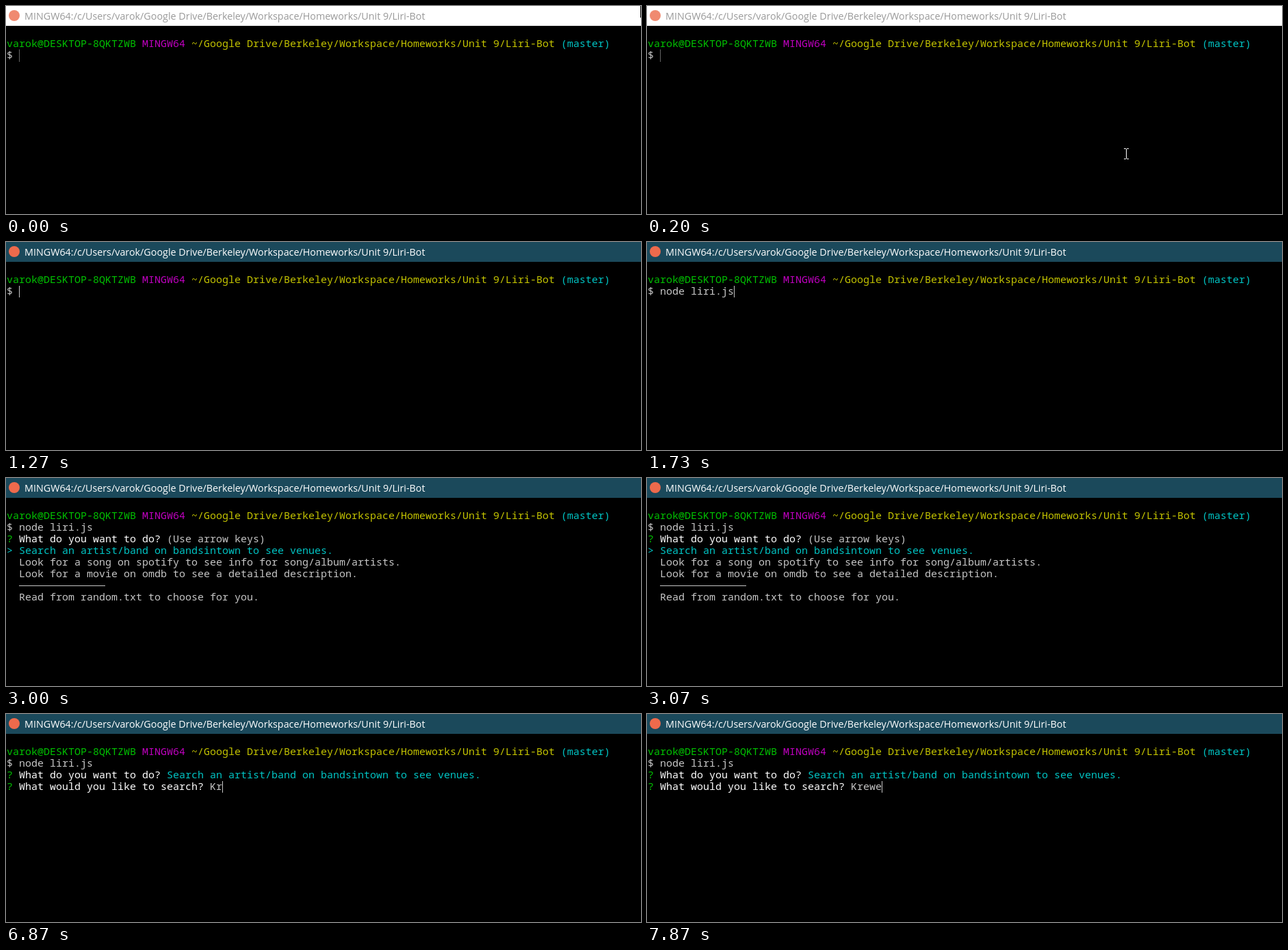
These frames come from a looping animation (928x304 px, 8000 ms). An HTML page with a canvas:

```html
<!DOCTYPE html>
<html lang="en">
<head>
<meta charset="utf-8">
<title>Terminal session</title>
<style>
html, body { margin: 0; width: 100%; height: 100%; overflow: hidden; background: #000; }
canvas { display: block; }
</style>
</head>
<body>
<canvas id="stage" width="928" height="304"></canvas>
<script>
const ctx = document.getElementById('stage').getContext('2d', { alpha: false });
const LOOP = 8000, CELL = 9, LINE = 17, LEFT = 1, TOP = 47;
const GREY = '#c6c6c6', WHITE = '#ffffff', GREEN = '#00c200',
      MAGENTA = '#bf00bf', YELLOW = '#c4c400', CYAN = '#00c4c4';

const USER = 'varok', HOST = 'DESKTOP-8QKTZWB';
const PATH = 'Google Drive/Berkeley/Workspace/Homeworks/Unit 9/Liri-Bot';
const TITLE = `MINGW64:/c/Users/${USER}/${PATH}`;
const CHOICE = 'Search an artist/band on bandsintown to see venues.';
const TASK = 'What do you want to do? ';
const SEARCH = 'What would you like to search? ';
const KEY_TIMES = [6670, 6870, 7130, 7470, 7870];
const ANSWER = 'Krewe';

function rect(x, y, w, h, color) {
  ctx.fillStyle = color;
  ctx.fillRect(x, y, w, h);
}

// Writes [text, color] spans one after another on a terminal row.
function write(row, ...spans) {
  ctx.font = '500 15px "Noto Sans Mono", "DejaVu Sans Mono", monospace';
  let x = LEFT;
  for (const [text, color] of spans) {
    ctx.fillStyle = color;
    ctx.fillText(text, x, TOP + row * LINE + 13);
    x += text.length * CELL;
  }
}

function caret(row, col, dotted = false) {
  const x = LEFT + col * CELL, y = TOP + row * LINE;
  if (!dotted) return rect(x, y, 1, LINE, GREY);
  for (let i = 0; i < LINE; i += 2) rect(x, y + i, 1, 1, GREY);
}

function titleBar(active) {
  rect(0, 0, 928, 29, active ? '#1b495b' : WHITE);
  ctx.fillStyle = active ? '#ee6a4c' : '#f08a70';
  ctx.beginPath();
  ctx.arc(12, 14, 8, 0, Math.PI * 2);
  ctx.fill();
  ctx.font = '14.33px "Open Sans", "Noto Sans", sans-serif';
  ctx.fillStyle = active ? WHITE : '#999999';
  ctx.fillText(TITLE, 27, 20);
}

function pointer(x, y) {
  for (const edge of [y - 8, y + 7]) {
    rect(x - 3, edge, 3, 1, WHITE);
    rect(x + 1, edge, 3, 1, WHITE);
  }
  rect(x, y - 7, 1, 14, WHITE);
}

function drawPointer(t) {
  if (t < 70) rect(927, 0, 1, 17, '#000');
  else if (t < 130) pointer(790, 130);
  else if (t < 200) pointer(716, 201);
  else if (t < 1270) pointer(700, 216);
}

function drawCommand(t) {
  write(1, ['$ ', GREY], [t < 1730 ? '' : 'node liri.js', GREY]);
  if (t < 400) caret(1, 2, true);
  else if (t < 930 || (t >= 1270 && t < 1730)) caret(1, 2);
  else if (t >= 1730 && t < 2270) caret(1, 14);
  else if (t >= 2330 && t < 3000) caret(2, 0);
}

function drawMenu() {
  write(2, ['? ', GREEN], [TASK, WHITE], ['(Use arrow keys)', GREY]);
  write(3, ['> ' + CHOICE, CYAN]);
  write(4, ['  Look for a song on spotify to see info for song/album/artists.', GREY]);
  write(5, ['  Look for a movie on omdb to see a detailed description.', GREY]);
  rect(LEFT + 2 * CELL, TOP + 6 * LINE + 8, 14 * CELL, 1, GREY);
  write(7, ['  Read from random.txt to choose for you.', GREY]);
}

function drawSearch(t) {
  const typed = KEY_TIMES.filter(key => t >= key).length;
  write(2, ['? ', GREEN], [TASK, WHITE], [CHOICE, CYAN]);
  write(3, ['? ', GREEN], [SEARCH, WHITE], [ANSWER.slice(0, typed), GREY]);
  if (t < 6200 || t >= 6530) caret(3, 2 + SEARCH.length + typed);
}

function draw(t) {
  rect(0, 0, 928, 304, '#000');
  titleBar(t >= 400);
  write(0, [`${USER}@${HOST} `, GREEN], ['MINGW64 ', MAGENTA],
    [`~/${PATH} `, YELLOW], ['(master)', CYAN]);
  drawCommand(t);
  if (t >= 5730) drawSearch(t);
  else if (t >= 3000) drawMenu();
  drawPointer(t);
}

const start = performance.now();
function tick() {
  draw((performance.now() - start) % LOOP);
  requestAnimationFrame(tick);
}
tick();
</script>
</body>
</html>
```
